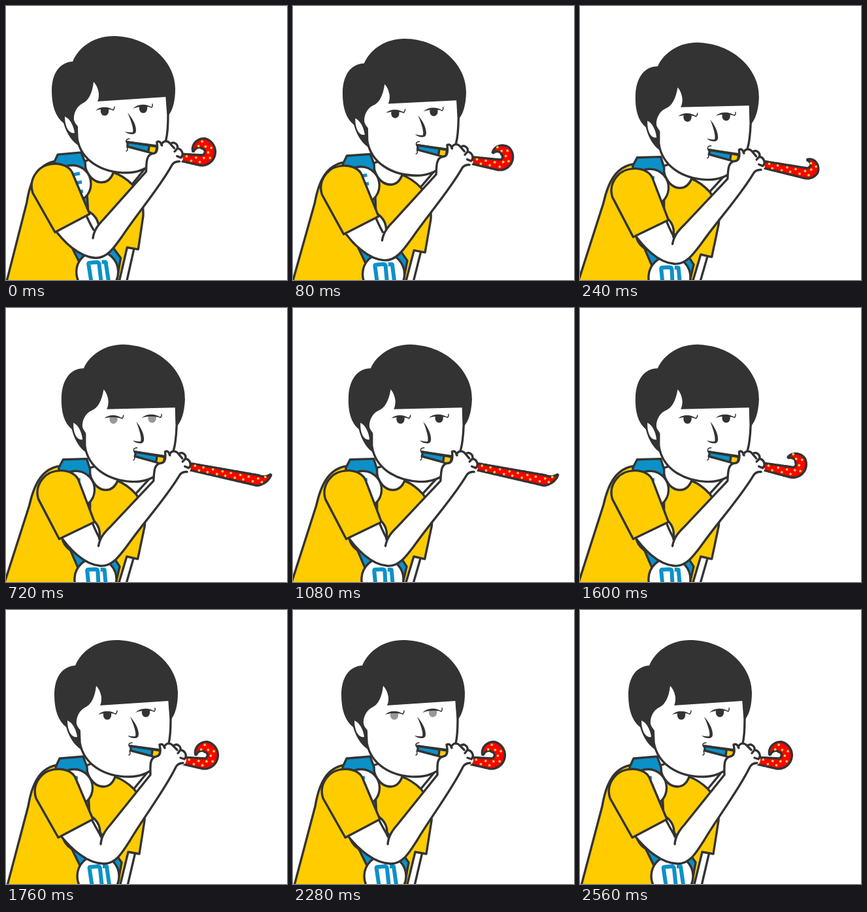
Recreate the animation shown at these times as an HTML page. Size 430 by 419 pixels, loop 3.2 s.

```html
<!DOCTYPE html>
<html lang="en">
<head>
<meta charset="utf-8">
<title>Party horn</title>
<style>
  html, body { margin: 0; width: 100%; height: 100%; overflow: hidden; background: #fff; }
  svg { display: block; width: 430px; height: 419px; }
  .ink { fill: none; stroke: #333; stroke-width: 3.4; stroke-linecap: round; stroke-linejoin: round; }
  .white { fill: #fff; }
  .yellow { fill: #fc0; }
  .blue { fill: #0b91c8; }
  .dark { fill: #333; }
  .thin { stroke-width: 1.5; }
  .letter { fill: none; stroke: #0b91c8; stroke-width: 6; stroke-linejoin: round; }
</style>
</head>
<body>
<svg viewBox="0 0 430 419">
  <g id="body">
    <path class="ink white" d="M185 364L170 430H184L198 370"/>
    <path class="ink yellow" d="M-3 440L34 300C40 264 52 242 78 237L122 238C126 262 139 270 149 270C159 270 164 263 167 255C178 259 188 266 196 274C207 287 213 300 212 322L204 373L187 370L170 440Z"/>
    <path class="ink white" d="M122 238C126 262 139 270 149 270C159 270 164 263 167 255L160 225Z"/>
    <path class="ink" d="M196 273L215 250"/>
    <path class="ink blue" d="M76 240L82 227L118 224L124 240L128 318L177 386L170 425H130L98 360L84 300Z"/>
    <circle class="ink white" cx="104" cy="272" r="28.500"/>
    <circle class="ink white" cx="115" cy="340" r="29"/>
    <circle class="ink white" cx="141" cy="407" r="32"/>
    <path class="letter" d="M129 393L140 392Q144 392 144 396L147 424H132L128 397Q127 393 129 393M148 392H154L158 420"/>
  </g>
  <g id="bars">
    <path class="letter" style="stroke-width:5" d="M100 258L110 256M103 271L113 269M106 285L115 283"/>
  </g>
  <g id="head">
    <path class="dark" d="M106 85C116 61 141 46 168 46C222 46 263 85 263 126C263 146 259 160 252 168L245 130L150 125L118 215C106 209 97 196 92 179C80 170 74 153 74 130C74 103 86 86 106 85Z"/>
    <path class="ink white" d="M113 203C119 236 150 255 188 255C222 255 245 230 249 204C252 192 252 178 252 166L249 125L144 130L112 180Z"/>
    <path class="dark" d="M138 116C146 124 148 138 143 146L249 139L251 168C259 160 263 140 261 120L170 80Z"/>
    <path class="dark" d="M138 116C136 134 130 145 121 149C111 154 107 166 108 174C109 180 115 183 114 186C111 190 112 198 114 208L102 192L94 160L112 120Z"/>
    <path class="white" d="M138 116C136 134 130 145 121 149C111 154 107 166 108 174C109 180 115 183 114 186L145 190L144 146C148 138 146 124 138 116Z"/>
    <path class="white" d="M94 169C101 172 107 181 109 194C101 196 94 186 94 169Z"/>
    <path class="dark" d="M190 163C198 172 203 182 203 190Q203 196 197 196Q190 196 186 192Q194 194 198 193Q200 186 190 163Z"/>
    <path class="ink thin" d="M193 203C188 203 186 207 190 210M190 214C187 216 193 220 188 222"/>
    <g id="eyes" class="dark">
      <path d="M149 158Q155 156 161 158C163 171 147 171 149 158Z"/>
      <path d="M208 154Q214 152 220 154C222 167 206 167 208 154Z"/>
    </g>
    <path class="dark" d="M141 160C148 153 161 153 170 160C161 157 150 157 141 160ZM198 157C206 149 219 149 229 156C219 153 208 153 198 157Z"/>
    <path class="ink thin" d="M167 159Q170 158 170 154M226 155Q229 154 228 150"/>
  </g>
  <g id="horn">
    <path class="ink" id="tube" style="fill:#f00"/>
    <path id="dots" fill="none" stroke="#ffcf33" stroke-width="3.800" stroke-linecap="round"/>
  </g>
  <g id="pipe">
    <path class="ink blue" d="M191 208L235 215L233 226L191 215Z"/>
    <path class="yellow" d="M224 215L234 216.500L232.500 224.500L223 222Z"/>
    <path class="ink" d="M190 208L236 214M224 215L223 222"/>
  </g>
  <g id="arm">
    <path class="white" d="M80 340C100 366 125 388 150 388C168 388 178 371 190 352C210 318 241 278 258 242C267 240 276 236 276 229C275 219 268 212 260 208C252 204 245 204 241 209L235 206L236 222C228 223 222 228 222 238L221 250L160 328L145 350L126 310Z"/>
    <path class="ink" d="M82 343C100 366 125 388 150 388C168 388 178 371 190 352C210 318 241 278 259 242C261 237 265 234 271 234M145 358C146 345 153 336 160 328L221 252C221 240 219 226 230 224Q237 223 236 212L235 206Q240 203 243 211M129 316Q138 334 145 345M242 210C245 202 252 203 256 208C261 203 268 208 267 214C274 215 278 223 273 228M256 208L262 214M267 214L263 219M273 228L267 226"/>
  </g>
  <g id="sleeve">
    <path class="yellow" d="M80 348L133 320L106 256C98 240 66 238 52 256C44 266 42 276 46 286Z"/>
    <path class="ink" d="M46 288L80 348L133 320L106 256C98 240 66 238 52 256C44 266 42 276 46 288Z"/>
  </g>
</svg>
<script>
const LOOP = 3200, STEP = 40;
const $ = id => document.getElementById(id);

// Pivot of each part, then [dx, dy, degrees] in the start and forward poses.
const parts = {
  body:   { pivot: [100, 330], start: [-2, 0, -0.5], forward: [0, 5.5, 3] },
  bars:   { pivot: [100, 330], start: [3, 0, 0],     forward: [0, 5.5, 3] },
  sleeve: { pivot: [100, 330], start: [-5, -2, 0],   forward: [2, 6, 2] },
  head:   { pivot: [184, 160], start: [-4, 0, 0],    forward: [9.5, 10.5, 2.5] },
  pipe:   { pivot: [191, 210], start: [-5, 0, 0],    forward: [7, 12, 1] },
  arm:    { pivot: [145, 358], start: [-12, -3, 3],  forward: [-3.5, 6, 4.6] }
};
const rest = [0, 0, 0];
// Horn base: x, y, heading
const base = { start: [264, 231, 0.14], forward: [276, 241.5, 0.2], rest: [268, 230, 0.14] };
// Time, straight length, curled length, turn of the curl
const roll = [
  [0, 34, 62, 4.8], [240, 72, 34, 3.3], [520, 109, 25, 1.1],
  [1200, 109, 25, 1.1], [1600, 48, 50, 4], [1760, 34, 62, 4.8]
];
// Eye opacity, one value per step
const blinks = [
  [720, [0.5, 0, 0.33, 0.67, 0.95, 0.5, 0, 0.33, 0.67, 1]],
  [2280, [0.5, 0, 0.5, 0.95, 0.5, 0, 0.5, 1]]
];

const mix = (a, b, k) => a.map((v, i) => v + (b[i] - v) * k);
const clamp = v => Math.max(0, Math.min(1, v));

function sample(keys, t) {
  const i = keys.findIndex(k => k[0] > t);
  if (i < 0) return keys[keys.length - 1].slice(1);
  const a = keys[i - 1], b = keys[i];
  return mix(a, b, (t - a[0]) / (b[0] - a[0])).slice(1);
}

function pose(start, forward, end, t) {
  return t < 1600 ? mix(start, forward, clamp(t / 200))
                  : mix(forward, end, clamp((t - 1600) / 160));
}

function drawHorn(t) {
  let [x, y, angle] = pose(base.start, base.forward, base.rest, t);
  const [straight, curl, turn] = sample(roll, t);
  const total = straight + curl, n = 72, ds = total / n;
  const left = [], right = [];
  let dots = '', next = 5, side = 1;
  for (let i = 0; i <= n; i++) {
    const s = i * ds;
    const half = (5 + 3 * Math.min(1, s / straight)) * Math.min(1, 0.1 + (total - s) / 24);
    const nx = -Math.sin(angle), ny = Math.cos(angle);
    const at = d => (x + nx * d).toFixed(1) + ' ' + (y + ny * d).toFixed(1);
    left.push(at(-half));
    right.unshift(at(half));
    if (s >= next && s < total - 8) {
      dots += 'M' + at(side * 2.9) + 'h.01';
      next += 7;
      side = -side;
    }
    if (s >= straight) angle -= turn * ds / curl;
    x += Math.cos(angle) * ds;
    y += Math.sin(angle) * ds;
  }
  $('tube').setAttribute('d', 'M' + left.concat(right).join('L') + 'Z');
  $('dots').setAttribute('d', dots);
}

function eyeOpacity(t) {
  for (const [from, steps] of blinks) {
    const i = (t - from) / STEP;
    if (i >= 0 && i < steps.length) return steps[i];
  }
  return 1;
}

function draw(t) {
  for (const id in parts) {
    const { pivot, start, forward } = parts[id];
    const [dx, dy, deg] = pose(start, forward, rest, t);
    $(id).setAttribute('transform', `translate(${dx} ${dy}) rotate(${deg} ${pivot})`);
  }
  drawHorn(t);
  $('eyes').setAttribute('opacity', eyeOpacity(t));
}

const origin = performance.now();
function tick() {
  const t = (performance.now() - origin) % LOOP;
  draw(Math.floor(t / STEP) * STEP);
  requestAnimationFrame(tick);
}
tick();
</script>
</body>
</html>
```
